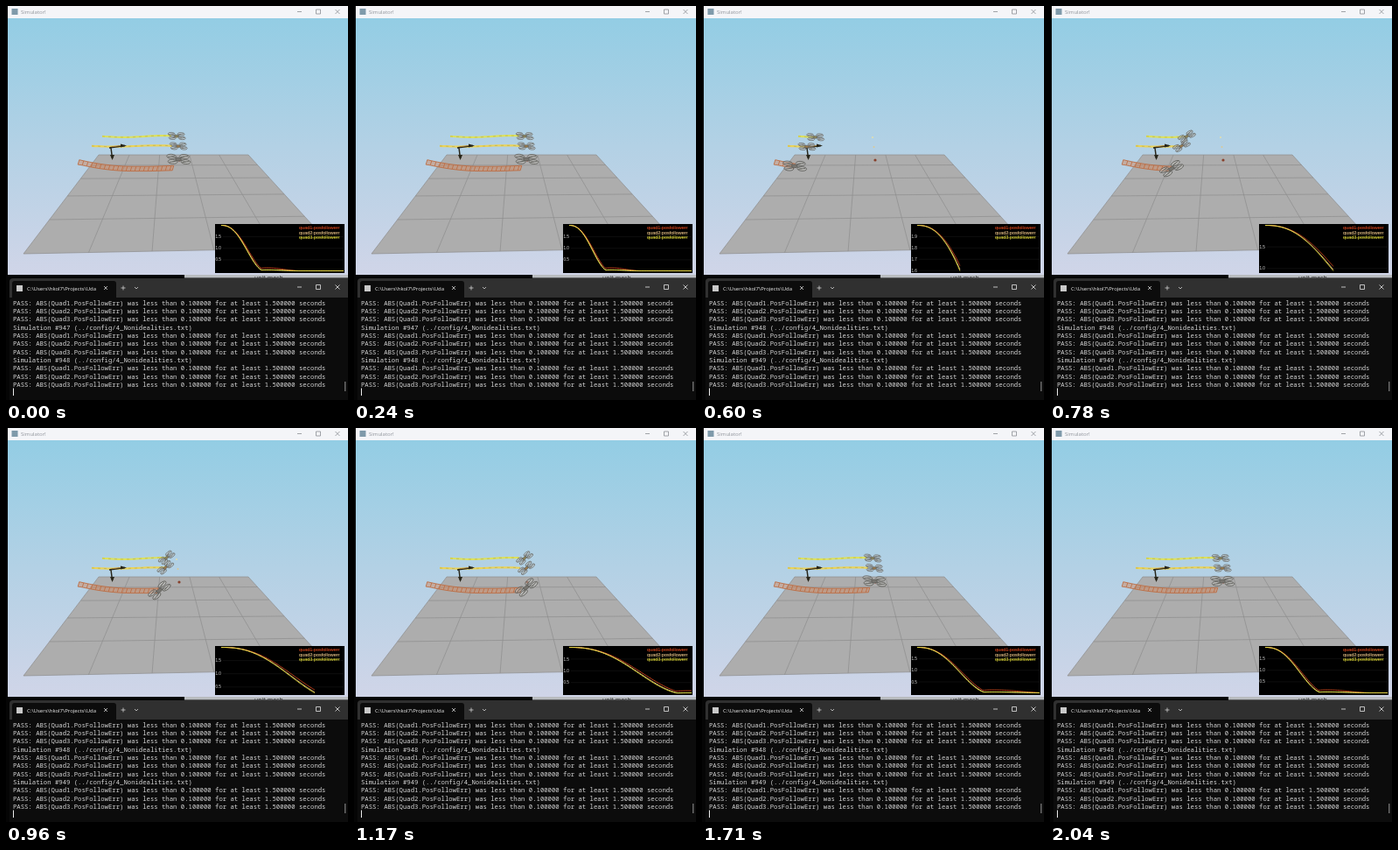
An HTML page for the animation above (2.07 s loop, 391x450 px).

```html
<!DOCTYPE html>
<html lang="en">
<head>
<meta charset="utf-8">
<title>Simulator</title>
<style>
  html, body { margin: 0; width: 100%; height: 100%; overflow: hidden; background: #050505; }
  svg { display: block; width: 391px; height: 450px; }
  .ui { font-family: "Open Sans", "Noto Sans", sans-serif; }
  .mono { font-family: "Noto Sans Mono", "DejaVu Sans Mono", monospace; font-size: 7.27px; fill: #d6d6d6; white-space: pre; }
  .plot { font-family: "Liberation Sans", Arial, sans-serif; }
</style>
</head>
<body>
<svg id="stage" viewBox="0 0 391 450" xmlns="http://www.w3.org/2000/svg">
  <defs>
    <linearGradient id="sky" x1="0" y1="0" x2="0" y2="1">
      <stop offset="0" stop-color="#93cde4"/>
      <stop offset=".5" stop-color="#b3d1e5"/>
      <stop offset="1" stop-color="#d0d5e8"/>
    </linearGradient>
    <clipPath id="plotClip"><rect x="239" y="249" width="148" height="56"/></clipPath>
    <clipPath id="stripClip"><rect x="204" y="307" width="187" height="3.5"/></clipPath>
  </defs>
  <rect width="391" height="450" fill="#050505"/>
  <rect x="2" y="14" width="389" height="293" fill="url(#sky)"/>
  <rect x="2" width="389" height="14" fill="#f4f5f8"/>
  <rect x="6.5" y="3" width="7" height="7" fill="#7f9aaa"/>
  <text class="ui" x="17" y="9" font-size="6" fill="#8e9299">Simulator!</text>
  <g id="ground"></g>
  <g id="trails" fill="none"></g>
  <g id="markers"></g>
  <g id="quads"></g>
  <rect x="239" y="249" width="148" height="56" fill="#000"/>
  <g id="plot" class="plot" clip-path="url(#plotClip)"></g>
  <g clip-path="url(#stripClip)">
    <rect x="204" y="307" width="187" height="4" fill="#b9bcc0"/>
    <text class="ui" x="284" y="313" font-size="7" fill="#222">unit mech</text>
  </g>
  <path d="M4 450V315q0-4 4-4H391V450Z" fill="#303030"/>
  <path d="M4 333H7V317q0-3 3-3H123q3 0 3 3V333H391V450H4Z" fill="#0c0c0c"/>
  <rect x="12" y="319" width="7" height="7" fill="#c9c9c9"/>
  <text class="ui" x="24" y="325" font-size="6" fill="#f0f0f0">C:\Users\hkol7\Projects\Uda</text>
  <g id="buttons" fill="none" stroke-width=".8"></g>
  <g id="console" class="mono"></g>
  <rect x="8" y="436.5" width="1" height="8.5" fill="#eee"/>
  <rect x="387.3" y="429" width="1" height="11" fill="#999"/>
</svg>
<script>
const LOOP = 2070, STEP = 30, RESET = 296, PREVIOUS_AGE = 2343, WINDOW = 870;
const $ = id => document.getElementById(id);
const clamp = (v, a = 0, b = 1) => Math.min(b, Math.max(a, v));
const smooth = (a, b, v) => { const u = clamp((v - a) / (b - a)); return u * u * (3 - 2 * u); };
const line = pts => 'M' + pts.map(p => p.map(v => v.toFixed(2)).join(' ')).join('L');
const path = (d, attrs) => `<path d="${d}" ${attrs}/>`;
const range = (n, f) => Array.from({ length: n }, (_, i) => f(i));

// Floor grid under perspective
function drawGround() {
  const A = [106, 170], B = [277, 170], C = [374, 276], D = [20, 283];
  const dx1 = B[0] - C[0], dx2 = D[0] - C[0], sx = A[0] - B[0] + C[0] - D[0];
  const dy1 = B[1] - C[1], dy2 = D[1] - C[1], sy = A[1] - B[1] + C[1] - D[1];
  const det = dx1 * dy2 - dx2 * dy1;
  const g = (sx * dy2 - dx2 * sy) / det, h = (dx1 * sy - sx * dy1) / det;
  const at = (u, v) => [0, 1].map(k =>
    ((B[k] * (1 + g) - A[k]) * u + (D[k] * (1 + h) - A[k]) * v + A[k]) / (g * u + h * v + 1));
  const grid = range(6, i => line([at(i / 5, 0), at(i / 5, 1)]) + line([at(0, i / 5), at(1, i / 5)])).join('');
  $('ground').innerHTML = path(line([A, B, C, D]) + 'Z', 'fill="#adadad"') +
    path(grid, 'fill="none" stroke="#8d8d8d" stroke-width=".7"');
}

function drawFixed() {
  drawGround();
  $('markers').innerHTML =
    path('M118 162L136 159.5M120 162L121.5 174', 'stroke="#28261a" stroke-width="1.5"') +
    path('M131 157.6L138 159.6L131 161.4ZM119 170L124 170L121.6 176Z', 'fill="#28261a"') +
    path('M121 160.7L131 159.5', 'stroke="#b8842c" stroke-width=".8"') +
    '<circle cx="198" cy="176" r="1.6" fill="#87402c"/>' +
    '<circle cx="195" cy="150" r="1.1" fill="#e0dfb0"/><circle cx="196.5" cy="161" r="1" fill="#dbc995"/>';
  const controls = (y, color) => path(
    `M333 ${y}h5M354.5 ${y - 2.5}h5v5h-5ZM376.5 ${y - 2.5}l5 5m0-5l-5 5`, `stroke="${color}"`);
  $('buttons').innerHTML = controls(6.5, '#8b8e94') + controls(321, '#e4e4e4') +
    path('M112 320l4 4m0-4l-4 4M131.5 322h5m-2.500-2.500v5M147 321l2 2l2-2', 'stroke="#d0d0d0"');
}

function drawConsole(run) {
  const pass = n => `PASS: ABS(Quad${n}.PosFollowErr) was less than 0.100000 for at least 1.500000 seconds`;
  const sim = n => `Simulation #${n} (../config/4_Nonidealities.txt)`;
  const tests = [1, 2, 3].map(pass);
  const rows = [...tests, sim(run - 1), ...tests, sim(run), ...tests];
  $('console').innerHTML = rows.map((s, i) => `<text x="8" y="${341.6 + i * 9.33}">${s}</text>`).join('');
}

// Follow error in metres, by age of the run in ms
const quads = [
  { color: '#d4451c', duration: 885, x0: 86, x1: 197, size: 1.35, tint: '#777570',
    y: x => 186 - 7.5 * clamp(1 - (x - 84) / 62) ** 2 - clamp((x - 165) / 30), lift: 10 },
  { color: '#ecc58a', duration: 850, x0: 101, x1: 197, size: 1, tint: '#9a7a4c',
    y: x => 160 + .7 * Math.sin((x - 101) / 15), lift: 0 },
  { color: '#e9e23c', duration: 838, x0: 113, x1: 195, size: 1, tint: '#8c8458',
    y: x => 149 + .9 * Math.sin((x - 113) / 14), lift: 0 }
];
const error = (q, age) => 1 + Math.cos(Math.PI * clamp(age / q.duration) ** 1.2);
const plotted = (q, age) => {
  const tail = q === quads[0] ? .13 : .04;
  return Math.max(error(q, age), tail * smooth(500, 850, age) * (1 - smooth(900, 1500, age)) + .02);
};

const tilts = [[0, 0], [70, 28], [130, 30], [300, 5], [485, -27], [700, -40], [875, -36], [1145, -8], [1415, 7], [1745, 3], [2200, 4]];
function tilt(age) {
  const i = tilts.findIndex(k => k[0] > age);
  if (i < 0) return tilts[tilts.length - 1][1];
  const [a, b] = [tilts[i - 1], tilts[i]];
  return a[1] + (b[1] - a[1]) * (age - a[0]) / (b[0] - a[0]);
}

function drone(q, x, y, angle) {
  const rotors = [[-6, -2], [5, -2.6], [-4.6, 2.4], [6.4, 1.8]].map(([cx, cy]) =>
    `<ellipse cx="${cx}" cy="${cy}" rx="4" ry="1.8" fill="#c5c5c0" fill-opacity=".45"/>` +
    path(`M${cx - 3} ${cy + .6}L${cx + 3} ${cy - .6}`, '')).join('');
  return `<g transform="translate(${x} ${y}) rotate(${angle}) scale(${q.size})" stroke="#62625e" stroke-width=".65">` +
    path('M-6 -2L6.400 1.800M5 -2.600L-4.600 2.400', 'stroke-width="1"') + rotors +
    `<ellipse rx="2.4" ry="1.4" fill="${q.tint}"/></g>`;
}

function ribbon(q, end) {
  const point = (x, off) => [x, q.y(x) + off];
  const xs = range(Math.max(2, Math.ceil((end - 83) / 5) + 1), i => Math.min(end, 83 + i * 5));
  const top = xs.map(x => point(x + .8, -2.8)), bottom = xs.map(x => point(x - .8, 2.6));
  return path(line([...top, ...bottom.slice().reverse()]) + 'Z', 'fill="#d28a62" fill-opacity=".5"') +
    path(line(top) + line(bottom) + xs.map((x, i) => line([top[i], bottom[i]])).join(''),
      'stroke="#bd6e45" stroke-width=".9"');
}

function trail(q, end, color) {
  const start = q.x0 - 3;
  const pts = range(25, i => { const x = start + (end - start) * i / 24; return [x, q.y(x)]; });
  return path(line(pts), `stroke="${color}" stroke-width="2.2"`) +
    path(line(pts), 'stroke="#b7aa45" stroke-width=".6" stroke-dasharray="3 4"');
}

function drawScene(age) {
  const xs = quads.map(q => q.x0 + (q.x1 - q.x0) * (1 - error(q, age) / 2));
  const shown = i => xs[i] > quads[i].x0 + 5;
  $('trails').innerHTML =
    (shown(0) ? ribbon(quads[0], Math.min(xs[0], 191)) : '') +
    (shown(1) ? trail(quads[1], Math.min(xs[1], 190), '#ead35b') : '') +
    (shown(2) ? trail(quads[2], Math.min(xs[2], 189), '#dce160') : '');
  $('quads').innerHTML = quads.map((q, i) =>
    drone(q, xs[i], q.y(xs[i]) - q.lift * smooth(650, 1300, age), tilt(age))).join('');
}

function drawPlot(age) {
  const low = Math.min(...quads.map(q => plotted(q, age)));
  const span = Math.max(2 - low, .002);
  const px = t => 246 + 140 * t / Math.max(age, WINDOW);
  const py = e => 250.5 + 52 * (2 - e) / span;
  const step = [.001, .002, .005, .01, .02, .05, .1, .2, .5].find(s => span / s <= 5) || .5;
  const digits = step < .01 ? 3 : step < .1 ? 2 : 1;
  let out = '';
  for (let e = 2 - step; e > Math.max(low, .1); e -= step) {
    out += path(`M248 ${py(e)}H386`, 'stroke="#1c1c1c" stroke-width=".5"') +
      `<text x="239.500" y="${py(e) + 1.6}" font-size="4.6" fill="#ddd">${e.toFixed(digits)}</text>`;
  }
  quads.forEach((q, i) => {
    const pts = range(91, k => [px(age * k / 90), py(plotted(q, age * k / 90))]);
    out += path(line(pts), `fill="none" stroke="${q.color}" stroke-width=".9"`) +
      path(`M335 ${253.5 + i * 5.5}H381`, `stroke="${q.color}" stroke-width=".5" opacity=".7"`) +
      `<text x="381.500" y="${255.4 + i * 5.5}" text-anchor="end" font-size="5.5" fill="${q.color}">quad${i + 1}.posfollowerr</text>`;
  });
  $('plot').innerHTML = out;
}

let lastRun, lastTime;
function update(time) {
  const t = Math.floor((time % LOOP) / STEP) * STEP;
  if (t === lastTime) return;
  lastTime = t;
  const age = t < RESET ? PREVIOUS_AGE + t : t - RESET;
  const run = t < RESET ? 948 : 949;
  if (run !== lastRun) drawConsole(lastRun = run);
  drawScene(age);
  drawPlot(age);
}

drawFixed();
update(0);
const begin = performance.now();
requestAnimationFrame(function tick() {
  update(performance.now() - begin);
  requestAnimationFrame(tick);
});
</script>
</body>
</html>
```
